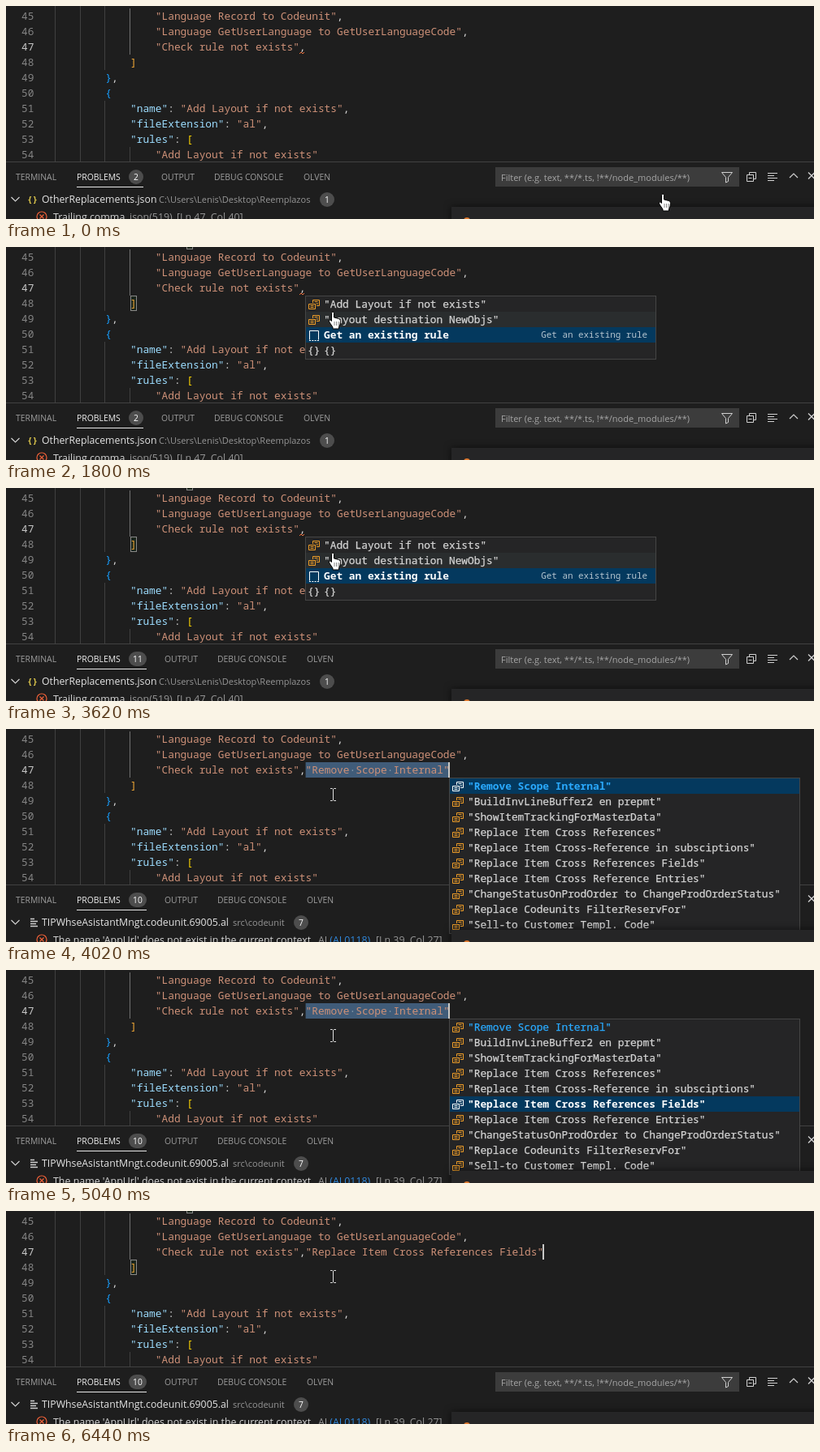
Animation of 994 by 263 pixels, one loop 6860 ms. Source, as an HTML page:

```html
<!DOCTYPE html>
<html lang="en">
<head>
<meta charset="utf-8">
<title>Code editor completion</title>
<style>
  html, body { margin: 0; width: 100%; height: 100%; overflow: hidden; background: #1e1e1e; }
  svg { display: block; width: 994px; height: 263px; }
  text { white-space: pre; fill: #d4d4d4; font-family: "Open Sans", "Noto Sans", sans-serif; }
  .code { font: 12.83px "Noto Sans Mono", "DejaVu Sans Mono", monospace; fill: #d4d4d4; }
  .item { stroke: #d4d4d4; stroke-width: .25px; }
  .match { fill: #2aaaff; stroke: #2aaaff; }
  .bold { font-weight: 700; fill: #fff; stroke: none; }
  .bold.match { fill: #2aaaff; }
  .detail { font-size: 10.9px; fill: #b4c4cf; text-anchor: end; }
  .tab { font-size: 10.4px; fill: #9d9d9d; }
  .title { font-size: 12.3px; fill: #e4e4e4; }
  .path { font-size: 11px; fill: #969696; }
  .message { font-size: 12.4px; }
  .badge { font-size: 10.3px; fill: #fff; text-anchor: middle; }
  .line { fill: none; stroke: #d0d0d0; }
  .toast { filter: drop-shadow(0 0 5px rgba(0, 0, 0, .6)); }
</style>
</head>
<body>
<svg id="stage" viewBox="0 0 994 263"></svg>
<script>
const LOOP = 6860;
const CHAR = 7.7;
const CODE_X = 60.6;
const STRING = '#ce9178', KEY = '#9cdcfe', PLAIN = '#d4d4d4', MUTED = '#969696';
const GOLD = '#ffd700', AMBER = '#efa636', BLUE = '#179fff';

const stage = document.getElementById('stage');
const layers = [];

const rect = (x, y, w, h, fill, extra = '') =>
  `<rect x="${x}" y="${y}" width="${w}" height="${h}" fill="${fill}" ${extra}/>`;
const text = (x, y, content, type, extra = '') =>
  `<text x="${x}" y="${y}" class="${type}" ${extra}>${content}</text>`;
const line = (d, extra = '') => `<path class="line" d="${d}" ${extra}/>`;
const span = (content, color) => `<tspan fill="${color}">${content}</tspan>`;
const columnX = column => CODE_X + column * CHAR;
const rowTop = number => 3 + (number - 45) * 19;
const move = (x, y, content) => `<g transform="translate(${x} ${y})">${content}</g>`;

// Adds markup that is shown only in the given time spans; none means always.
function layer(markup, ...spans) {
  stage.insertAdjacentHTML('beforeend', `<g>${markup}</g>`);
  if (spans.length) layers.push({ node: stage.lastElementChild, spans });
}

function codeRow(number, column, ...parts) {
  const y = rowTop(number) + 14;
  const activeBlock = number >= 45 && number <= 47;
  let markup = '';
  for (let depth = 0; depth < column; depth += 4) {
    const color = activeBlock && depth === 12 ? '#707070' : '#404040';
    markup += rect(Math.floor(columnX(depth) - .4), rowTop(number), 1, 19, color);
  }
  const numberColor = number === 47 ? '#c6c6c6' : '#858585';
  return markup
    + text(19, y, span(number, numberColor), 'code')
    + text(columnX(column), y, parts.map(([content, color]) => span(content, color)).join(''), 'code');
}

const comma = [',', PLAIN];
const property = (name, value) => [[`"${name}"`, KEY], [': ', PLAIN], value];

function editor() {
  return [
    codeRow(44, 12, ...property('rules', ['[', AMBER])),
    codeRow(45, 16, ['"Language Record to Codeunit"', STRING], comma),
    codeRow(46, 16, ['"Language GetUserLanguage to GetUserLanguageCode"', STRING], comma),
    codeRow(47, 16, ['"Check rule not exists"', STRING], comma),
    codeRow(48, 12, [']', AMBER]),
    codeRow(49, 8, ['}', BLUE], comma),
    codeRow(50, 8, ['{', BLUE]),
    codeRow(51, 12, ...property('name', ['"Add Layout if not exists"', STRING]), comma),
    codeRow(52, 12, ...property('fileExtension', ['"al"', STRING]), comma),
    codeRow(53, 12, ...property('rules', ['[', GOLD])),
    codeRow(54, 16, ['"Add Layout if not exists"', STRING]),
  ].join('');
}

const bracketBox = (column, number) =>
  rect(Math.round(columnX(column)) + .5, rowTop(number) + .5, 7, 18, 'rgba(0,100,0,.1)', 'stroke="#888"');

const caret = x => rect(x, 41, 2, 19, '#c8c8c6');

function badge(x, y, count) {
  const width = String(count).length > 1 ? 22 : 18;
  return rect(x, y - 9, width, 18, '#4d4d4d', 'rx="9"') + text(x + width / 2, y + 4, count, 'badge');
}

function panelTabs(count) {
  const shift = count > 9 ? 4 : 0;
  const tab = (x, label) => text(x, 215, label, 'tab');
  return text(87, 215, 'PROBLEMS', 'tab', 'style="fill:#f0f0f0"')
    + badge(151, 211, count)
    + rect(87, 223, 82 + shift, 1, '#e7e7e7')
    + tab(191 + shift, 'OUTPUT') + tab(256 + shift, 'DEBUG CONSOLE') + tab(366 + shift, 'OLVEN');
}

function panel() {
  return rect(0, 192, 994, 71, '#1e1e1e') + rect(0, 192, 994, 1, '#424242')
    + text(12, 215, 'TERMINAL', 'tab')
    + rect(602, 199, 300, 24, '#3c3c3c')
    + text(609, 215.5, 'Filter (e.g. text, **/*.ts, !**/node_modules/**)', 'path', 'style="fill:#a6a6a6"')
    + line('M880.5 205.5h13l-5 6v5l-3 1.5v-6.5z')
    + line('M914.5 208.5v-3h8v8h-3M911.5 208.5h8v8h-8zM913.5 212.5h4')
    + line('M937 206.5h12M937 209.5h8M937 212.5h12M937 215.5h8')
    + line('M964 212l5-5 5 5', 'stroke-width="1.2"')
    + line('M987 205.5l8 8m0-8l-8 8', 'stroke-width="1.3"')
    + line('M6.5 236l5 5 5-5', 'stroke-width="1.2"')
    + '<g stroke="#ee6038" stroke-width="1.2" fill="none"><circle cx="44" cy="260" r="6"/><path d="M41.5 257.5l5 5m0-5l-5 5"/></g>';
}

const jsonProblem = text(26, 243, '{}', 'code', 'style="fill:#d6c04a;font-weight:700;font-size:11px"')
  + text(44, 243, 'OtherReplacements.json', 'title')
  + text(188, 243, 'C:\\Users\\Lenis\\Desktop\\Reemplazos', 'path')
  + badge(386, 239, 1)
  + text(58, 265, 'Trailing comma', 'message')
  + text(152, 265, span('json(519)', MUTED), 'message')
  + text(210, 265, span('[Ln 47, Col 40]', MUTED), 'message');

const codeProblem = line('M30 234.5h5M30 237.5h9M30 240.5h7M30 243.5h9', 'stroke-width="1.3"')
  + text(44, 243, 'TIPWhseAsistantMngt.codeunit.69005.al', 'title')
  + text(279, 243, 'src\\codeunit', 'path')
  + badge(354, 239, 7)
  + text(58, 265, "The name 'AppUrl' does not exist in the current context.", 'message')
  + text(384, 265, span('AL', MUTED) + span('(AL0118)', '#3088dc'), 'message')
  + text(455, 265, span('[Ln 39, Col 27]', MUTED), 'message');

const icons = {
  value: color => line('M5.5 4V.5h8v7H10M7.5 2.5h4M9.5 5h2.5M.5 5.5h8v6h-8zM2.5 7.5h4M2.5 9.5h4', `style="stroke:${color}"`),
  snippet: color => line('M1.5 11.5V.5h11v11', `style="stroke:${color}"`)
    + line('M1 12.5h12', `style="stroke:${color}" stroke-dasharray="2 1.3"`),
  braces: () => text(-1, 10, '{}', 'code item'),
};

function popup(x, items, selected, hovered) {
  const rows = items.map(({ label, icon = 'value', detail, match }, index) => {
    const top = 61 + index * 19;
    const active = index === selected;
    const background = active ? '#04395e' : index === hovered ? '#2a2d2e' : '';
    const iconColor = active ? '#fff' : icon === 'value' ? '#ee9d28' : PLAIN;
    const type = `code item${active ? ' bold' : ''}${match ? ' match' : ''}`;
    return (background && rect(x + 1, top, 430, 19, background))
      + move(x + 4, top + 4, icons[icon](iconColor))
      + text(x + 23, top + 14, label, type)
      + (active && detail ? text(x + 421, top + 13, detail, 'code detail') : '');
  });
  const height = items.length * 19 + 2;
  return rect(x + .5, 60.5, 431, height, '#252526', 'stroke="#454545"') + rows.join('');
}

const ruleItems = [
  { label: '"Add Layout if not exists"' },
  { label: '"Layout destination NewObjs"' },
  { label: 'Get an existing rule', icon: 'snippet', detail: 'Get an existing rule' },
  { label: '{}', icon: 'braces' },
];

const choiceItems = [
  'Remove Scope Internal', 'BuildInvLineBuffer2 en prepmt', 'ShowItemTrackingForMasterData',
  'Replace Item Cross References', 'Replace Item Cross-Reference in subsciptions',
  'Replace Item Cross References Fields', 'Replace Item Cross Reference Entries',
  'ChangeStatusOnProdOrder to ChangeProdOrderStatus', 'Replace Codeunits FilterReservFor',
  'Sell-to Customer Templ. Code',
].map((name, index) => ({ label: `"${name}"`, match: index === 0 }));

const insertX = columnX(40);
const inserted = content => text(insertX, 55, content, 'code', `style="fill:${STRING}"`);
const dottedChoice = '"Remove Scope Internal"'.replaceAll(' ', span('·', '#8a9cab'));

const hand = '<path d="M-1.5 1.5a1.5 1.5 0 0 1 3 0V7l6 1.5q2 .7 2 3 0 4-2 7v2.5H0v-2l-4-6q-1.3-2.2 0-3t2.5 1.5z"'
  + ' fill="#fff" stroke="#000"/><path d="M2 12v5M4.5 12v5M7 12v5" stroke="#555" stroke-width=".7"/>';
const beam = line('M-3-7.5h2.5l1 1 1-1h2.5M.5-7v14M-3 7.5h2.5l1-1 1 1h2.5', 'style="stroke:#ddd"');

// Editor
layer(rect(insertX, 41, 23 * CHAR, 19, '#405c79'), [4020, 5440]);
layer(rect(insertX, 41, 38 * CHAR, 19, '#3a3a3a'), [5440, 5640]);
layer(bracketBox(21, 44) + bracketBox(12, 48), [200, 4020], [5640, LOOP]);
layer(editor());
layer(line('M361 59l2-2 2 2 2-2', 'style="stroke:#f1703c"'), [0, 4020]);
layer(inserted(dottedChoice), [4020, 5440]);
layer(inserted('"Replace Item Cross References Fields"'), [5440, LOOP]);
layer(caret(367), [200, 800], [1200, 1800], [2220, 2620], [3220, 3620]);
layer(caret(544), [4020, 4440], [4840, 5440]);
layer(caret(660), [5440, 6040], [6440, LOOP]);

// Problems panel
layer(panel());
layer(panelTabs(2), [0, 2420]);
layer(panelTabs(11), [2420, 4020]);
layer(panelTabs(10), [4020, LOOP]);
layer(jsonProblem, [0, 4020]);
layer(codeProblem, [4020, LOOP]);

// Completion lists: each selection lasts until the next one begins
function popupSteps(x, items, selections, times, hovered) {
  selections.forEach((selected, step) =>
    layer(popup(x, items, selected, hovered), [times[step], times[step + 1]]));
}
popupSteps(368, ruleItems, [0, 1, 2], [200, 600, 800, 4020], 1);
popupSteps(545, choiceItems, [0, 2, 3, 4, 5], [4020, 4440, 4640, 4840, 5040, 5440]);

// Notification and pointer
layer(rect(548, 248, 460, 40, '#252526', 'class="toast"') + '<circle cx="567" cy="265" r="4" fill="#e07a2f"/>');
layer(move(808, 232, hand), [0, 200]);
layer(move(402, 80, hand), [200, 4020]);
layer(move(402, 81, beam), [4020, LOOP]);

const startTime = performance.now();
function draw() {
  const time = Math.max(0, performance.now() - startTime) % LOOP;
  for (const { node, spans } of layers) {
    const shown = spans.some(([from, to]) => time >= from && time < to);
    node.style.display = shown ? '' : 'none';
  }
  requestAnimationFrame(draw);
}
draw();
</script>
</body>
</html>
```
